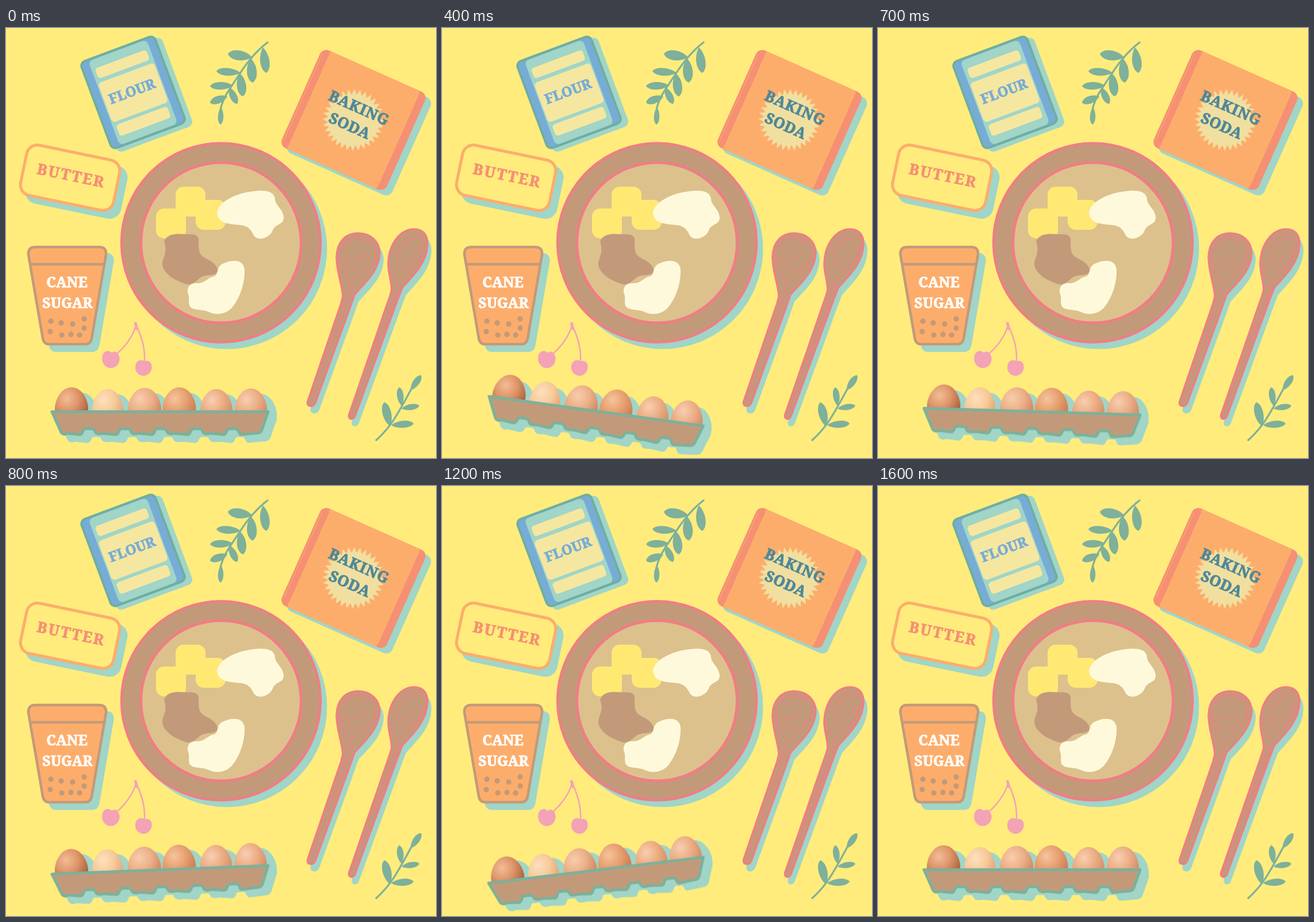
An HTML page that plays this animation: 748 by 748 pixels, repeating every 1700 ms.

```html
<!DOCTYPE html>
<html lang="en">
<head>
<meta charset="utf-8">
<title>Baking table</title>
<style>
  html, body { margin: 0; width: 100%; height: 100%; overflow: hidden; background: #ffec7c; }
  svg { display: block; width: 100vw; height: 100vh; }
  text { font: bold 25px "Noto Serif", "Liberation Serif", serif; text-anchor: middle; stroke-width: .9px; }
  #carton { transform-origin: 275px 669px; }
</style>
</head>
<body>
<svg id="stage" viewBox="0 0 748 748"></svg>
<script>
const C = {
  paper: '#ffec7c', shade: '#a0d5c8', orange: '#fdad6b', salmon: '#f59074', brown: '#c29a7a',
  pink: '#f07d84', tan: '#dcc18d', cream: '#fff9dc', green: '#7eb09a', blue: '#77acd6',
  label: '#f5e7a0', burst: '#f1dfa0', ink: '#4f8898', cherry: '#f4a2b6', butter: '#ffe973'
};

const path = (d, fill, extra = '') => `<path d="${d}" fill="${fill}" ${extra}/>`;
const line = (d, color, width) =>
  path(d, 'none', `stroke="${color}" stroke-width="${width}" stroke-linecap="round" stroke-linejoin="round"`);
const rect = (x, y, w, h, r, fill, extra = '') =>
  `<rect x="${x}" y="${y}" width="${w}" height="${h}" rx="${r}" fill="${fill}" ${extra}/>`;
const box = (w, h, r, fill, extra) => rect(-w / 2, -h / 2, w, h, r, fill, extra);
const disc = (x, y, r, fill, extra = '') => `<circle cx="${x}" cy="${y}" r="${r}" fill="${fill}" ${extra}/>`;
const oval = (x, y, rx, ry, fill, extra = '') =>
  `<ellipse cx="${x}" cy="${y}" rx="${rx}" ry="${ry}" fill="${fill}" ${extra}/>`;
const edge = (color, width) => `stroke="${color}" stroke-width="${width}" stroke-linejoin="round"`;
const word = (s, x, y, fill, size = 25, gap = 0) =>
  `<text x="${x + gap / 2}" y="${y}" fill="${fill}" stroke="${fill}" style="font-size:${size}px;letter-spacing:${gap}px">${s}</text>`;
const place = (x, y, deg, body) => `<g transform="translate(${x} ${y}) rotate(${deg})">${body}</g>`;

// Leaf running from its base to its tip, widest past the middle
function leaf([x, y, tx, ty, w]) {
  const dx = tx - x, dy = ty - y, len = Math.hypot(dx, dy);
  const nx = -dy / len * w * .63, ny = dx / len * w * .63;
  const at = (f, s) => `${x + dx * f + nx * s} ${y + dy * f + ny * s}`;
  return path(`M${x} ${y}C${at(.3, 1)} ${at(.86, 1)} ${tx} ${ty}C${at(.86, -1)} ${at(.3, -1)} ${x} ${y}Z`, C.green);
}

function flour() {
  return place(232, 116, -20.4, box(141, 165, 10, C.shade)) +
    place(221, 112, -20.4,
      box(137, 161, 9, C.blue, edge('#6fae9f', 4)) +
      rect(-54, -78, 108, 156, 8, C.shade) +
      rect(-48, -62, 95, 19, 5, C.label) +
      rect(-52, -36, 104, 73, 6, C.label) +
      rect(-48, 43, 95, 21, 5, C.label) +
      word('FLOUR', -1, 6, C.blue, 24));
}

function soda() {
  const spikes = 32, pts = [];
  for (let i = 0; i < spikes * 2; i++) {
    const a = i * Math.PI / spikes, r = i % 2 ? 44 : 54;
    pts.push((r * Math.cos(a)).toFixed(1) + ',' + (r * Math.sin(a)).toFixed(1));
  }
  return place(614, 169.5, 24, box(200, 186, 12, C.shade)) +
    place(604.5, 160, 24,
      box(200, 186, 12, C.salmon) +
      rect(-97, -90, 92, 180, 10, C.orange) +
      rect(-86, -93, 172, 186, 5, C.orange) +
      rect(-96, -91, 11, 182, 5, C.salmon) +
      `<polygon points="${pts.join(' ')}" fill="${C.burst}"/>` +
      word('BAKING', 0, -14, C.ink, 26, 1) + word('SODA', -2, 21, C.ink, 26, .2));
}

function butter() {
  return place(122.5, 272.5, 11.7, box(170, 94, 21, C.shade)) +
    place(111.5, 260.5, 11.7,
      box(165, 89, 19, C.paper, edge(C.orange, 5)) + word('BUTTER', 0, 5, C.salmon, 26, 2.4));
}

function sugar() {
  const cup = 'M51 381H162Q175 381 174 394L149 540Q147 550 138 550H75Q66 550 64 540L39 394Q38 381 51 381Z';
  const grains = [[78, 510], [96, 513], [116, 515], [136, 506], [77, 528], [97, 534], [113, 533], [128, 534], [136, 522]];
  return `<g transform="translate(12 12)">${path(cup, C.shade, edge(C.shade, 3))}</g>` +
    path(cup, C.orange, edge(C.brown, 4.5)) + line('M43 411H171', C.brown, 4.5) +
    word('CANE', 106, 451, '#fff') + word('SUGAR', 107, 487, '#fff', 24.5) +
    grains.map(([x, y]) => disc(x, y, 4.7, C.brown)).join('');
}

function bowl() {
  const cube = (x, y) => rect(x, y, 52, 52, 14, C.butter);
  return disc(384, 384, 174.5, C.shade) +
    disc(374, 373.5, 173, C.brown, edge(C.pink, 4.5)) +
    disc(374, 373.5, 139.5, C.tan, edge(C.pink, 5)) +
    cube(295, 276) + cube(261, 314) + cube(330, 299) +
    rect(299, 314, 14, 14, 0, C.butter) + rect(330, 299, 17, 29, 0, C.butter) +
    path('M367 322C368 305 395 288 430 284C452 281 467 284 468 298C469 310 482 314 483 330C483 343 468 340 464 352C460 364 440 372 432 362C427 354 425 346 410 343C390 341 369 341 367 322Z', C.cream) +
    path('M275 372C280 356 300 358 315 359C332 358 337 362 335 375C335 392 338 396 350 402C362 408 368 415 368 422C368 432 350 428 340 433C330 440 325 448 315 446C298 441 275 430 272 412C272 398 282 392 275 372Z', C.brown) +
    path('M316 460C315 448 322 443 332 444C346 445 350 434 362 432C371 428 365 416 377 410C394 402 413 402 415 420C416 445 406 470 395 484C385 498 366 500 355 495C345 490 338 491 328 489C312 485 322 472 316 460Z', C.cream);
}

function spoon(d, grain) {
  return `<g transform="translate(6 12)">${path(d, C.shade, edge(C.shade, 2))}</g>` +
    path(d, C.brown, edge(C.pink, 3.5)) + grain;
}

function spoons() {
  const thin = `stroke="${C.pink}" stroke-width="1.3"`;
  return spoon('M586 467C585 445 575 425 575 398C576 372 591 357 612 357C635 357 650 372 650 392C648 425 622 445 606 464L602 476L538 652C535 660 522 660 525 649L583 479Z',
      oval(612, 392, 31, 29, 'none', thin + ' transform="rotate(-25 612 392)"') +
      line('M580 399C581 420 592 432 599 443C615 435 640 420 644 394', C.pink, 1.3) +
      line('M589 380C598 365 620 362 630 376M588 396C594 409 614 408 626 392', C.pink, 1.3) +
      line('M599 443C594 466 590 478 580 508L532 648M604 452L596 472L568 552', C.pink, 1.3)) +
    spoon('M671 456C671 440 665 428 665 410C666 375 686 350 710 350C727 350 734 362 733 378C731 412 703 435 689 452L682 470L607 675C604 683 594 681 597 672L668 466Z',
      oval(704, 388, 21, 31, 'none', thin + ' transform="rotate(28 704 388)"') +
      line('M670 410C672 424 677 434 681 442C700 428 724 405 727 378', C.pink, 1.3) +
      line('M688 392C692 372 706 362 718 368M689 404C702 406 714 394 719 382', C.pink, 1.3) +
      line('M681 442C679 462 670 480 660 508L603 668M686 448L676 474L640 570', C.pink, 1.3));
}

function sprigs() {
  const top = [[428, 51, 386, 45, 18], [408, 78, 366, 75, 14], [395, 100, 355, 101, 14], [385, 119, 355, 130, 14],
    [447, 34, 453, 78, 17], [426, 53, 429, 95, 18], [407, 79, 412, 119, 17], [388, 103, 402, 132, 13], [374, 138, 373, 168, 10]];
  const low = [[704, 630, 722, 604, 12], [688, 657, 684, 625, 12], [668, 693, 658, 651, 16], [688, 662, 719, 657, 11], [670, 691, 709, 688, 13]];
  return line('M455 25C434 41 420 59 407 79C393 101 378 118 373 142', C.green, 3.2) + top.map(leaf).join('') +
    line('M644 717C666 697 676 680 688 659C694 648 700 638 706 626', C.green, 3.2) + low.map(leaf).join('');
}

function cherries() {
  return line('M226 518C220 538 206 556 188 571M227 518C237 540 242 558 241 580', C.cherry, 2.6) +
    line('M225.5 514L227.5 523', C.cherry, 5) +
    path('M184 565C192 558 200 570 197 580C194 590 185 593 178 591C169 588 165 578 168 569C171 560 180 560 184 565Z', C.cherry) +
    path('M241 580C249 576 256 584 253 594C250 603 242 607 234 604C226 601 223 592 226 584C229 577 237 576 241 580Z', C.cherry);
}

function carton() {
  // x, top, half width, light, mid and dark tones
  const eggs = [
    [114, 625, 29, '#f3bd95', '#de9468', '#a9603c'],
    [177, 628, 27, '#fde0bd', '#f8cb9b', '#e2a573'],
    [241, 626, 29, '#f8cdac', '#ecb088', '#cd8661'],
    [301.5, 625, 29, '#f6c49c', '#e7a070', '#c97c50'],
    [366, 628, 28, '#f8cfb0', '#ecad83', '#d18e66'],
    [426, 627, 28, '#f8ceb0', '#ecae86', '#cf8b66']
  ];
  const egg = (x, y, r, fill) =>
    path(`M${x} ${y}C${x + r * .6} ${y} ${x + r} ${y + 21} ${x + r} ${y + 37}C${x + r} ${y + 68} ${x - r} ${y + 68} ${x - r} ${y + 37}C${x - r} ${y + 21} ${x - r * .6} ${y} ${x} ${y}Z`, fill);
  let base = 'M80 667.5H456L445 699Q443 704 437 704.5L410 707';
  for (let x = 394; x > 100; x -= 62.5)
    base += `Q${x + 13} 708 ${x + 11} 702Q${x + 9} 697 ${x + 5} 697H${x - 5}Q${x - 9} 697 ${x - 11} 703Q${x - 13} 708 ${x - 18} 707L${x - 38} 705`;
  base += 'L103 706.5Q97 707 95 701Z';
  const shadow = eggs.map(([x, y, r]) => egg(x + 16, y + 9, r + 1, C.shade)).join('') +
    `<g transform="translate(13 12)">${path(base, C.shade, edge(C.shade, 5))}</g>`;
  const tones = eggs.map(([, , , a, b, c], i) =>
    `<radialGradient id="tone${i}" cx=".36" cy=".32" r=".72"><stop stop-color="${a}"/><stop offset=".5" stop-color="${b}"/><stop offset="1" stop-color="${c}"/></radialGradient>`).join('');
  return `<defs>${tones}</defs><g id="carton">` + shadow +
    eggs.map(([x, y, r], i) => egg(x, y, r, `url(#tone${i})`)).join('') +
    path(base, C.brown, edge(C.green, 5)) + '</g>';
}

document.getElementById('stage').innerHTML =
  flour() + soda() + butter() + sugar() + bowl() + spoons() + sprigs() + cherries() + carton();

// Rocking: time in ms, angle, number of jumps until the next row
const LOOP = 1700;
const rock = [[0, 0, 5], [500, 9.8, 5], [1000, -10.3, 6], [1600, 0, 1], [LOOP, 0, 1]];
document.getElementById('carton').animate(
  rock.map(([t, deg, n]) => ({ offset: t / LOOP, transform: `rotate(${deg}deg)`, easing: `steps(${n})` })),
  { duration: LOOP, iterations: Infinity });
</script>
</body>
</html>
```
